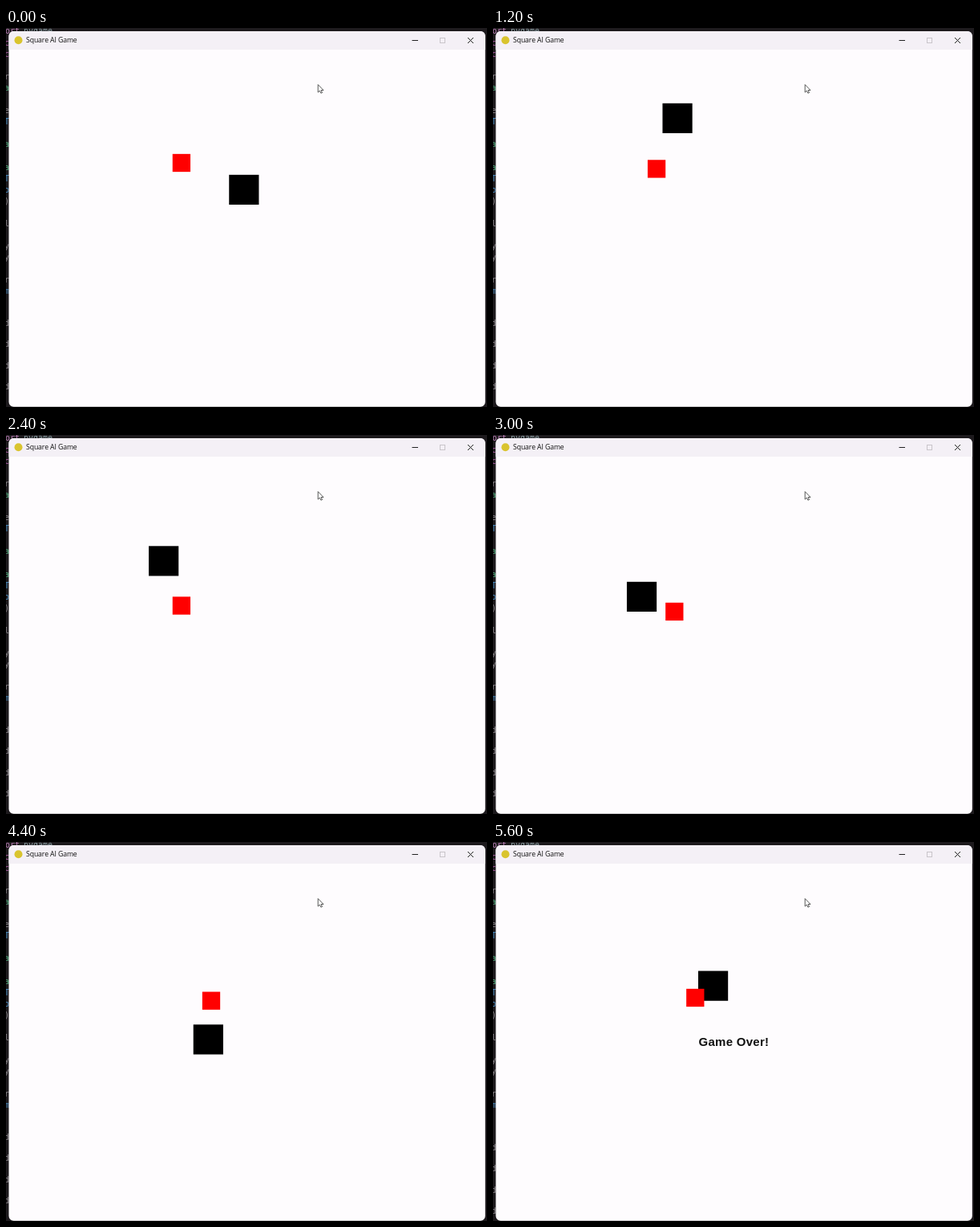
Write an HTML page that moves like this. It is 600 px wide and 472 px high and loops after 5700 ms.

```html
<!DOCTYPE html>
<html lang="en">
<head>
<meta charset="utf-8">
<title>Square AI Game</title>
<style>
  html, body { margin: 0; width: 100%; height: 100%; overflow: hidden; background: #1d1a1d; }
  svg { display: block; width: 600px; height: 472px; }
  .code { font: 10px "DejaVu Sans Mono", monospace; }
  .title { font: 8.7px "Open Sans", "Noto Sans", sans-serif; letter-spacing: -.1px; fill: #111; }
  .over { font: bold 15px "Liberation Sans", Arial, sans-serif; letter-spacing: .28px; fill: #111; }
</style>
</head>
<body>
<svg viewBox="0 0 600 472">
  <defs>
    <clipPath id="frame"><rect x="3.5" y="4" width="594.3" height="467.7" rx="6"/></clipPath>
  </defs>
  <rect width="600" height="472" fill="#1d1a1d"/>

  <g class="code">
    <text x="-1" y="6.5" fill="#b67bb2">ort</text>
    <text x="22" y="6.5" fill="#8fa3a8">pygame</text>
    <g id="editor"></g>
    <g id="terminal"></g>
  </g>

  <g clip-path="url(#frame)">
    <rect x="3" y="4" width="596" height="468" fill="#fefcfe"/>
    <rect x="3" y="4" width="596" height="23" fill="#f4f0f6"/>
  </g>

  <circle cx="15.5" cy="15.2" r="5" fill="#d9c42e"/>
  <text class="title" x="25" y="18.4">Square AI Game</text>
  <g fill="none" stroke="#222">
    <path d="M506.5 15.5h7.5"/>
    <rect x="541.5" y="12.5" width="6" height="6" stroke="#c9c5ca"/>
    <path d="M576 12l7 7m0-7l-7 7"/>
  </g>

  <rect id="black" width="37.2" height="37.2"/>
  <rect id="red" width="22.3" height="22.3" fill="#f00"/>
  <text id="over" class="over" x="256.5" y="254">Game Over!</text>

  <path d="M389.2 70.5v9.6l2.2-2 1.5 3.1 1.6-.7-1.4-3h2.9z" fill="#fff" stroke="#444" stroke-width=".9"/>
</svg>
<script>
const LOOP = 5700, TICK = 100, SCALE = 0.742;
const $ = id => document.getElementById(id);

// Editor and terminal letters showing past the window's left edge
const hues = { c: "#b05fa8", a: "#4fae7c", T: "#4a8fc4", o: "#4a8fc4", m: "#4a8fc4" };
function column(group, letters, top, pitch) {
  [...letters].forEach((letter, i) => {
    const t = document.createElementNS("http://www.w3.org/2000/svg", "text");
    t.setAttribute("x", -2);
    t.setAttribute("y", top + i * pitch);
    t.setAttribute("fill", hues[letter] || "#8c888c");
    t.textContent = letter;
    $(group).append(t);
  });
}
column("editor", "cc ra eT a aTo) l yy rm", 22, 14.05);
column("terminal", "dddd", 371, 26.3);

// Turning points in game units: move number, x, y
const blackPath = [
  [0, 370, 210], [5, 310, 120], [9, 280, 75], [16, 265, 120], [23, 235, 150],
  [29, 220, 210], [34, 250, 300], [41, 310, 270], [44, 355, 225], [48, 370, 195],
  [50, 340, 180]
];
const redPath = [
  [0, 275, 175], [8, 245, 175], [16, 275, 200], [23, 275, 235], [27, 275, 245],
  [34, 315, 245], [41, 325, 215], [50, 320, 210]
];
const idleTicks = [6, 36, 37, 48, 49, 54];

// Straight runs between turning points, snapped to the mover's step
function place(el, path, move, step, originX) {
  const i = Math.max(1, path.findIndex(p => p[0] >= move));
  const a = path[i - 1], b = path[i];
  const k = (move - a[0]) / (b[0] - a[0]);
  const snap = (axis, origin) =>
    origin + step * Math.round((a[axis] + (b[axis] - a[axis]) * k - origin) / step);
  el.setAttribute("x", 3.7 + SCALE * snap(1, originX));
  el.setAttribute("y", 27 + SCALE * snap(2, 0));
}

function draw() {
  const tick = Math.floor(performance.now() % LOOP / TICK);
  const move = tick - idleTicks.filter(idle => idle <= tick).length;
  const ended = tick === LOOP / TICK - 1;
  place($("black"), blackPath, move, 15, 10);
  place($("red"), redPath, move, 5, 0);
  $("over").style.visibility = ended ? "visible" : "hidden";
  $("terminal").setAttribute("transform", `translate(0 ${ended ? 13 : 0})`);
  requestAnimationFrame(draw);
}
draw();
</script>
</body>
</html>
```
